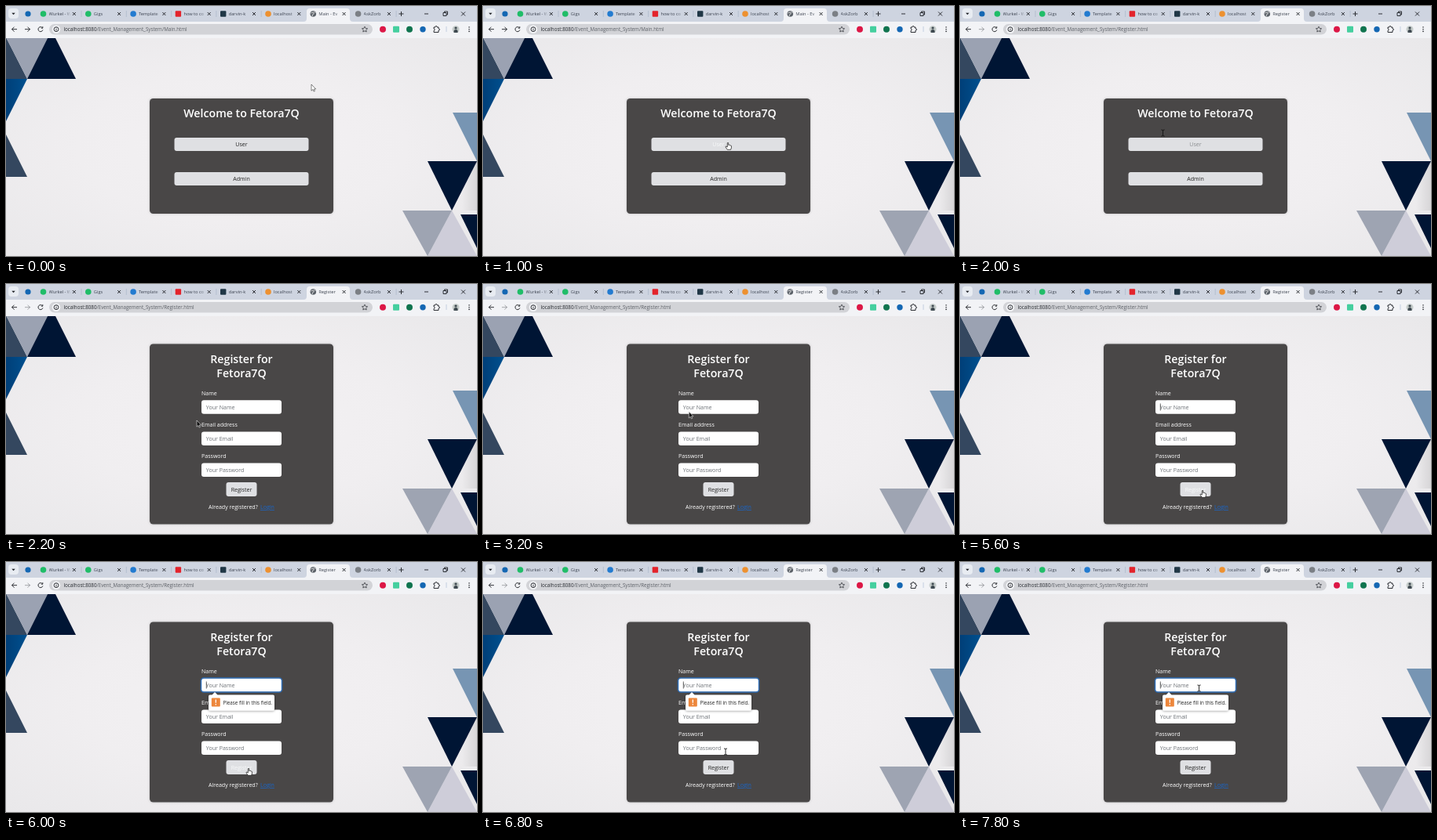
An HTML page for the animation above (8000 ms loop, 600 by 319 pixels).

```html
<!DOCTYPE html>
<html lang="en">
<head>
<meta charset="utf-8">
<title>Event registration demo</title>
<style>
  html, body { margin: 0; width: 100%; height: 100%; overflow: hidden; }
  svg { display: block; width: 100%; height: 100%; font: 7.05px "Open Sans", "Noto Sans", sans-serif; }
  .title { font-size: 14.2px; font-weight: 600; fill: #fff; }
  .mid { text-anchor: middle; }
  .tab { font-size: 5.7px; fill: #3c4350; }
  .line { fill: none; stroke: #25282d; stroke-width: .95; }
  .label { fill: #fff; }
  .hint { fill: #6b7075; }
</style>
</head>
<body>
<svg id="stage" viewBox="0 0 600 319" preserveAspectRatio="none">
  <defs>
    <radialGradient id="paper" cx=".5" cy=".5" r=".7">
      <stop stop-color="#f3f1f3"/><stop offset=".5" stop-color="#f0eef0"/><stop offset="1" stop-color="#e9e8ea"/>
    </radialGradient>
    <linearGradient id="blue" x2="1"><stop stop-color="#003f78"/><stop offset="1" stop-color="#00508f"/></linearGradient>
    <linearGradient id="edgeShade"><stop offset=".4" stop-opacity="0"/><stop offset="1" stop-opacity=".09"/></linearGradient>
    <linearGradient id="fadeOut"><stop offset=".76" stop-color="#fff"/><stop offset="1" stop-color="#000"/></linearGradient>
    <mask id="clipTitle" maskUnits="userSpaceOnUse" x="0" y="0" width="28" height="20">
      <rect width="28" height="20" fill="url(#fadeOut)"/>
    </mask>
    <filter id="cardShadow" x="-10%" y="-10%" width="120%" height="120%">
      <feDropShadow dx="0" dy="0" stdDeviation="1.5" flood-opacity=".22"/>
    </filter>
    <filter id="bubbleShadow" x="-20%" y="-20%" width="140%" height="150%">
      <feDropShadow dx="0" dy="1" stdDeviation="1.5" flood-opacity=".35"/>
    </filter>
  </defs>

  <!-- page background -->
  <rect y="40" width="600" height="279" fill="url(#paper)"/>
  <path d="M0 40V93H27Z" fill="#34475f"/>
  <path d="M0 40H53.500L27 93Z" fill="#9ba2b2"/>
  <path d="M53.500 40H62.500L89 93H27Z" fill="#001534"/>
  <path d="M0 93H27L0 147Z" fill="url(#blue)"/>
  <path d="M0 164L27 218H0Z" fill="#34475f"/>
  <path d="M600 198L568 261H600Z" fill="url(#edgeShade)"/>
  <path d="M569 136H600V198Z" fill="#7795b3"/>
  <path d="M537 198H600L568 261Z" fill="#001534"/>
  <path d="M568 261L600 319H537Z" fill="#cecdd9"/>
  <path d="M505 261H568L537 319Z" fill="#9ea4b2"/>
  <path d="M579 266H600V309Z" fill="#001534"/>

  <!-- browser frame -->
  <rect width="600" height="21" fill="#ced4e0"/>
  <rect y="20" width="600" height="21" fill="#f2f3f6"/>
  <path d="M379 20q4 0 4-4V7q0-4 4-4H434q4 0 4 4v9q0 4 4 4Z" fill="#f2f3f6"/>
  <rect x="3" y="3" width="13" height="13" rx="4" fill="#e8ecf2"/>
  <path d="M7.300 8.800h4.400L9.500 11.300Z" fill="#25282d"/>
  <path class="line" d="M500.500 10h6m-3-3v6M533 10h5M557 8.500h4v4h-4zM558.500 8.500V7h4v4H561M580 7.500l5 5m0-5l-5 5"/>
  <circle cx="28" cy="10" r="3.600" fill="#1467b3"/>
  <g id="tabs"></g>
  <rect x="55" y="23" width="412" height="13.500" rx="6.700" fill="#d2d3d7"/>
  <circle cx="64" cy="29.700" r="5.300" fill="#f2f3f6"/>
  <g class="line">
    <path d="M14 29.700H7.500m3-3l-3 3 3 3"/>
    <path id="forward" d="M24 29.700h6.500m-3-3l3 3-3 3"/>
    <path d="M46.500 28a3 3 0 1 0 .4 2.500M46.800 26.200v2h-2"/>
    <circle cx="64" cy="29.700" r="2.900"/><path d="M64 29.300v2M64 27.700v.7"/>
    <path d="M457 26.200l1.100 2.300 2.500.3-1.900 1.700.5 2.500-2.200-1.200-2.200 1.200.5-2.500-1.900-1.700 2.500-.3Z" stroke-width=".7"/>
    <path d="M545 27h2c-.5-2 2.500-2 2 0h2v2c2-.5 2 2.500 0 2v2.500h-6v-2c1.600 0 1.600-2.500 0-2.500Z"/>
  </g>
  <path d="M561 26v7" stroke="#b9c6dc" stroke-width=".8"/>
  <g fill="#25282d"><circle cx="590" cy="27" r=".8"/><circle cx="590" cy="29.700" r=".8"/><circle cx="590" cy="32.400" r=".8"/></g>
  <circle cx="480" cy="29.700" r="4" fill="#dc1746"/>
  <rect x="493" y="25.700" width="8" height="8" rx="1" fill="#45cf9f"/>
  <circle cx="514" cy="29.700" r="4" fill="#10744f"/>
  <circle cx="531" cy="29.700" r="3.700" fill="#1467b3"/>
  <circle cx="573" cy="29.700" r="4.500" fill="#c5ccca"/>
  <path d="M570.500 34v-2q0-2 2.500-2t2.500 2v2Z" fill="#3e4950"/><circle cx="573" cy="28" r="1.600" fill="#3e4950"/>
  <text x="73.500" y="32" font-size="6.220" fill="#262a30">localhost:8080<tspan id="path" fill="#5c6067"></tspan></text>

  <g id="welcome">
    <rect x="183" y="118" width="234" height="147" rx="4.500" fill="#484647" filter="url(#cardShadow)"/>
    <text class="title mid" x="300" y="142">Welcome to Fetora7Q</text>
    <rect x="214.500" y="168" width="171" height="17" rx="3" fill="#dfe0e3"/>
    <text id="userText" class="mid" x="300" y="179">User</text>
    <rect x="214.500" y="212" width="171" height="17" rx="3" fill="#dfe0e3"/>
    <text class="mid" x="300" y="223" fill="#222">Admin</text>
  </g>

  <g id="register">
    <rect x="183" y="76.500" width="234" height="230" rx="4.500" fill="#484647" filter="url(#cardShadow)"/>
    <text class="title mid" x="300" y="101">Register for</text>
    <text class="title mid" x="300" y="119">Fetora7Q</text>
    <g id="fields"></g>
    <rect id="ring" x="248.500" y="148" width="103" height="18" rx="3.500" fill="none" stroke="#2f6db5" stroke-width="1.500"/>
    <path id="caret" d="M255.300 152.500v9" stroke="#222" stroke-width=".7"/>
    <rect x="280.500" y="253" width="39" height="18" rx="3" fill="#dfe0e3"/>
    <text id="registerText" class="mid" x="300" y="265">Register</text>
    <text class="label" x="258" y="287">Already registered?</text>
    <text x="324" y="287" fill="#1767cf" text-decoration="underline">Login</text>
    <g id="bubble">
      <path d="M260 169.500h2.500l3.500-3.500 3.500 3.500H340q2 0 2 2v16q0 2-2 2H260q-2 0-2-2v-16q0-2 2-2Z" fill="#fff" filter="url(#bubbleShadow)"/>
      <rect x="261.800" y="173.500" width="11" height="11" rx="1" fill="#ed873c"/>
      <path d="M267.300 175.500v4.300m0 1.300v1.400" stroke="#fff" stroke-width="1.300"/>
      <text x="276.500" y="182" font-size="6.250" fill="#222">Please fill in this field.</text>
    </g>
  </g>

  <g id="cursor">
    <path id="arrow" d="M0 0V8.200L1.900 6.500 3.100 9.100 4.400 8.500 3.200 6H5.700Z" stroke-width=".6"/>
    <path id="beam" d="M-2-4Q0-4 0-3Q0-4 2-4M0-3V3M-2 4Q0 4 0 3Q0 4 2 4" fill="none" stroke="#111" stroke-width=".9"/>
    <path id="hand" d="M-.7.700Q0-.6.700.700V3.500Q1.500 2.800 2 3.700Q2.900 3.100 3.300 4.100Q4.400 3.700 4.400 5V7L3.600 9.300H-.7L-3 6Q-3.100 4.800-2 5L-.7 6Z" fill="#fff" stroke="#111" stroke-width=".7"/>
  </g>
</svg>
<script>
const LOOP = 8000, STEP = 200;
const $ = id => document.getElementById(id);
const show = (id, on) => { $(id).style.display = on ? '' : 'none'; };

const tabs = [
  ['Wurkel - W', '#20bd68'], ['Gigs', '#20bd68'], ['Template', '#237bd0'], ['how to co', '#e3232b', true],
  ['darvin-k', '#203746', true], ['localhost', '#ed9130'], ['', '#5c6269'], ['AskZorb', '#7b7f85']
];
$('tabs').innerHTML = tabs.map(([title, color, square], i) => {
  const x = 47.5 + i * 57.3;
  const globe = i === 6 ? `<path d="M${x - 3} 9l3-1 1 2-2 1v2M${x + 1} 7l2 2" fill="none" stroke="#eee" stroke-width=".8"/>` : '';
  const icon = square
    ? `<rect x="${x - 3.7}" y="6.3" width="7.4" height="7.4" rx="1" fill="${color}"/>`
    : `<circle cx="${x}" cy="10" r="3.8" fill="${color}"/>${globe}`;
  const divider = i < 5 || i === 7 ? `<path d="M${x + 48.5} 6v8" stroke="#a5b1c5" stroke-width=".6"/>` : '';
  return `${icon}${divider}
    <g transform="translate(${x + 7})" mask="url(#clipTitle)"><text class="tab" y="12"${i === 6 ? ' id="activeTitle"' : ''}>${title}</text></g>
    <path class="line" d="M${x + 37.3} 8l4 4m0-4l-4 4"/>`;
}).join('');

$('fields').innerHTML = [['Name', 'Name'], ['Email address', 'Email'], ['Password', 'Password']].map(([label, hint], i) =>
  `<g transform="translate(249 ${i * 40.1})">
    <text class="label" y="142">${label}</text>
    <rect y="148.300" width="102" height="17.500" rx="3" fill="#fff"/>
    <text class="hint" x="5.800" y="160">Your ${hint}</text>
  </g>`).join('');

// time, x, y, pointer shape
const route = [
  [0, 389, 100, 'arrow'], [400, 384, 105, 'arrow'], [1000, 312, 174, 'hand'], [1600, 300, 175, 'hand'],
  [2000, 258.5, 162, 'beam'], [2200, 243, 174, 'arrow'], [2800, 246, 168, 'arrow'], [3400, 268, 161, 'beam'],
  [3800, 270.5, 163, 'beam'], [4400, 272, 168, 'arrow'], [5000, 306, 260, 'hand'], [5400, 309, 263, 'hand'],
  [6400, 309, 263, 'hand'], [6800, 309, 242, 'beam'], [7400, 305, 166, 'beam'], [7800, 304.5, 161, 'beam']
];

function pointerAt(t) {
  const i = route.findLastIndex(key => key[0] <= t);
  const [t0, x0, y0, shape] = route[i];
  const [t1, x1, y1] = route[i + 1] || [LOOP, x0, y0];
  const k = (t - t0) / (t1 - t0), ease = k * k * (3 - 2 * k);
  return { x: x0 + (x1 - x0) * ease, y: y0 + (y1 - y0) * ease, shape };
}

function draw(t) {
  const registering = t >= 2200, loaded = t >= 1800;
  const { x, y, shape } = pointerAt(t);
  show('welcome', !registering);
  show('register', registering);
  $('activeTitle').textContent = loaded ? 'Register' : 'Main - Ev';
  $('path').textContent = `/Event_Management_System/${loaded ? 'Register' : 'Main'}.html`;
  $('forward').setAttribute('opacity', loaded ? .4 : 1);

  const textColor = shape === 'hand' ? '#f8f9fa' : '#222';
  $('userText').setAttribute('fill', t === 2000 ? '#8b8d90' : textColor);
  $('registerText').setAttribute('fill', textColor);

  show('caret', t >= 5600 && (t - 5600) % 1060 < 530);
  show('ring', t >= 5800);
  show('bubble', t >= 5800);
  $('bubble').setAttribute('opacity', t < 6000 ? .5 : 1);

  for (const id of ['arrow', 'beam', 'hand']) show(id, id === shape);
  $('arrow').setAttribute('fill', registering ? '#111' : '#fff');
  $('arrow').setAttribute('stroke', registering ? '#eee' : '#333');
  $('cursor').setAttribute('transform', `translate(${x} ${y})`);
}

function tick(now) {
  draw(Math.floor(now % LOOP / STEP) * STEP);
  requestAnimationFrame(tick);
}
draw(0);
requestAnimationFrame(tick);
</script>
</body>
</html>
```
